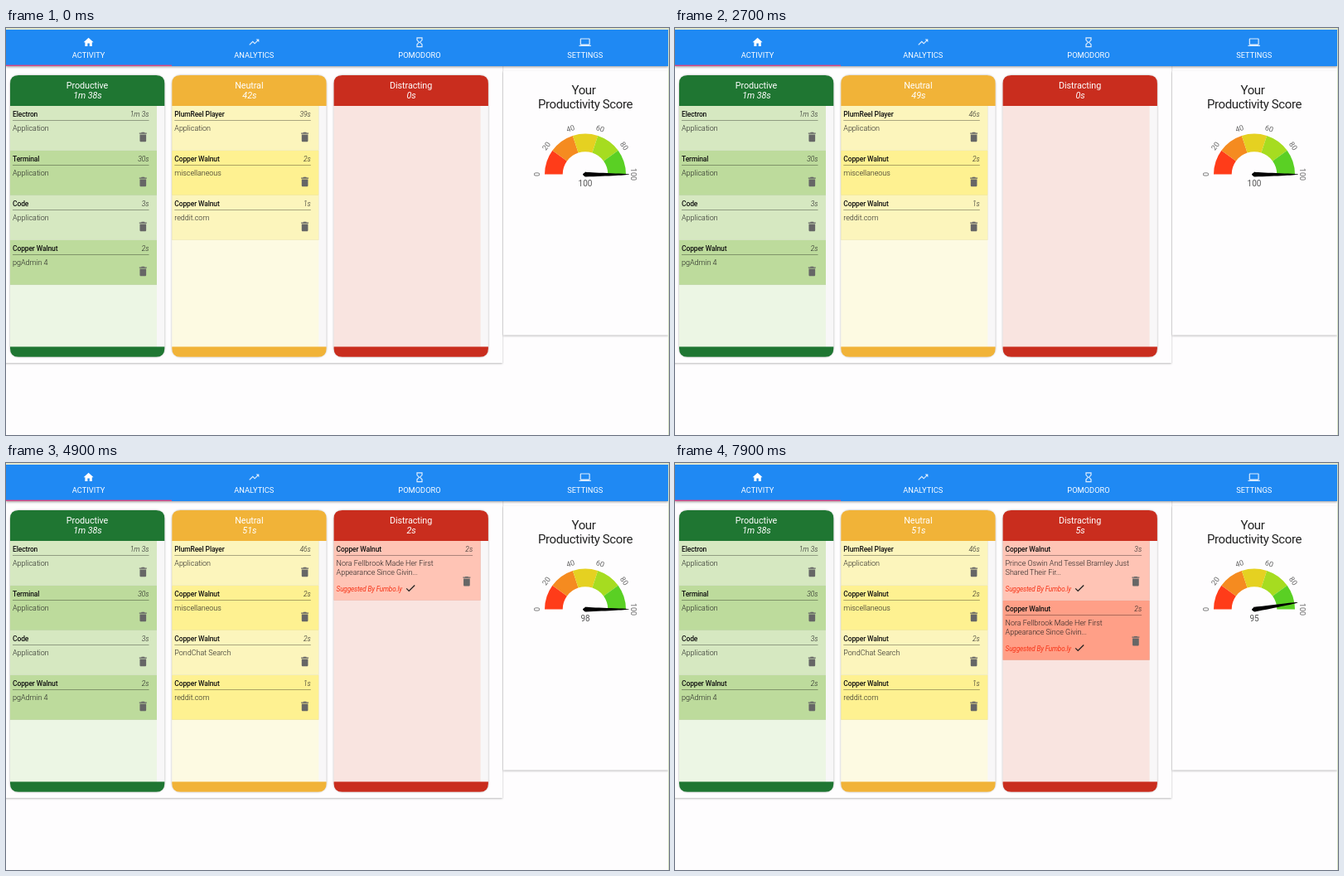
An HTML page that plays this animation: 800 px wide and 491 px high, repeating every 8 s.

```html
<!DOCTYPE html>
<html lang="en">
<head>
<meta charset="utf-8">
<title>Productivity dashboard</title>
<style>
  html, body { margin: 0; width: 100%; height: 100%; overflow: hidden; background: #fefdfe; }
  svg { display: block; width: 800px; height: 491px; font-family: Roboto, Arial, sans-serif; }
  .panel { fill: #fefdfe; filter: drop-shadow(0 1px 1px #0004); }
  .nav { font-size: 9.3px; fill: #fff; text-anchor: middle; }
  .head { font-size: 10.8px; letter-spacing: -.08px; fill: #fff; text-anchor: middle; }
  .name { font-size: 8.5px; font-weight: 500; letter-spacing: -.13px; fill: #111; }
  .time { font-size: 8.5px; font-weight: 300; font-style: italic; fill: #222; text-anchor: end; }
  .body { font-size: 9px; font-weight: 300; letter-spacing: -.03px; fill: #222; }
  .hint { font-size: 8.2px; font-style: italic; letter-spacing: -.17px; fill: #f73518; }
  .title { font-size: 15px; letter-spacing: -.38px; fill: #222; text-anchor: middle; }
  .tick { font-size: 9px; fill: #666; text-anchor: middle; }
  .score { font-size: 10px; fill: #555; text-anchor: middle; }
</style>
</head>
<body>
<svg viewBox="0 0 800 491"><g id="page"></g><g id="columns"></g><g id="gauge"></g></svg>
<script>
const LOOP = 8000, MOVE = 500;
const STEPS = [0, 800, 2800, 4820, 7350];
const SCORES = [100, 100, 100, 98, 95];
const BROWSER = 'Copper Walnut';

const ICONS = {
  home: 'M10 20v-6h4v6h5v-8h3L12 3 2 12h3v8z',
  trend: 'M16 6l2.29 2.29-4.88 4.88-4-4L2 16.59 3.41 18l6-6 4 4 6.3-6.29L22 12V6z',
  glass: 'M6 2v6l4 4-4 4v6h12v-6l-4-4 4-4V2zm10 14.5V20H8v-3.5l4-4zm-4-5l-4-4V4h8v3.5z',
  laptop: 'M20 18c1.1 0 2-.9 2-2V6c0-1.1-.9-2-2-2H4c-1.1 0-2 .9-2 2v10c0 1.1.9 2 2 2H0v2h24v-2zM4 6h16v10H4z',
  trash: 'M6 19c0 1.1.9 2 2 2h8c1.1 0 2-.9 2-2V7H6zM19 4h-3.5l-1-1h-5l-1 1H5v2h14z',
  check: 'M9 16.17L4.83 12l-1.42 1.41L9 19 21 7l-1.41-1.41z'
};

const rect = (x, y, w, h, fill, more = '') =>
  `<rect x="${x}" y="${y}" width="${w}" height="${h}" fill="${fill}" ${more}/>`;
const text = (cls, x, y, s, more = '') => `<text class="${cls}" x="${x}" y="${y}" ${more}>${s}</text>`;
const icon = (name, cx, cy, scale, fill, opacity = 1) =>
  `<path d="${ICONS[name]}" fill="${fill}" opacity="${opacity}" transform="translate(${cx} ${cy}) scale(${scale}) translate(-12 -12)"/>`;
const set = (id, html) => document.getElementById(id).innerHTML = html;

function page() {
  const tabs = [['ACTIVITY', 'home'], ['ANALYTICS', 'trend'], ['POMODORO', 'glass'], ['SETTINGS', 'laptop']];
  return '<rect class="panel" x="-2" y="40" width="601" height="364"/>' +
    '<rect class="panel" x="600" y="52" width="199" height="318.5"/>' +
    rect(0, 2, 799, 44, '#1f89f3', 'style="filter:drop-shadow(0 1px 1.5px #0006)"') +
    rect(0, 0, 800, 1.5, '#dce4c6') + rect(799, 0, 1, 491, '#d5e0c4') +
    rect(0, 44.6, 200, 1.4, '#e0487f') +
    tabs.map(([label, name], i) => {
      const x = 99.6 + i * 199.7;
      return icon(name, x, 17.2, .6, '#fff', i ? .85 : 1) + text('nav', x, 36.3, label);
    }).join('') +
    text('title', 697, 80, 'Your') + text('title', 699, 97, 'Productivity Score');
}

function card(x, y, fill, [name, time, lines, hinted]) {
  const h = hinted ? 72 : 54;
  return rect(x, y, 177, h - .3, fill, 'style="filter:drop-shadow(0 .5px .5px #0003)"') +
    text('name', x + 3, y + 13.2, name) + text('time', x + 167.5, y + 13.2, time) +
    rect(x + 3, y + 17.3, 164.5, .7, '#0007') +
    lines.split('|').map((s, i) => text('body', x + 3, y + 29.8 + i * 11, s)).join('') +
    icon('trash', x + 160.3, y + (hinted ? 48.7 : 37.6), .64, '#666') +
    (hinted ? text('hint', x + 3, y + 61, 'Suggested By Fumbo.ly') + icon('check', x + 92.5, y + 57, .62, '#222') : '');
}

function column(x, label, total, dark, pale, fills, cards) {
  let y = 94;
  const list = cards.map((c, i) => {
    const html = card(x, y, fills[i % 2], c);
    y += c[3] ? 72 : 54;
    return html;
  }).join('');
  return rect(x, 57, 186.3, 339.7, '#f8f7f8', 'rx="10" style="filter:drop-shadow(0 .7px 1px #0005)"') +
    rect(x, 94, 177, 291, pale) + list +
    `<path d="M${x} 94V67q0-10 10-10h166.3q10 0 10 10v27z" fill="${dark}"/>` +
    `<path d="M${x} 384.5v2.2q0 10 10 10h166.3q10 0 10-10v-2.2z" fill="${dark}"/>` +
    text('head', x + 93, 73, label) + text('head', x + 93.5, 85.3, total, 'font-style="italic"');
}

function columns(step) {
  const work = [['Electron', '1m 3s', 'Application'], ['Terminal', '30s', 'Application'],
    ['Code', '3s', 'Application'], [BROWSER, '2s', 'pgAdmin 4']];
  const neutral = [['PlumReel Player', step ? '46s' : '39s', 'Application'],
    [BROWSER, '2s', 'miscellaneous'], [BROWSER, '1s', 'reddit.com']];
  if (step > 1) neutral.splice(2, 0, [BROWSER, '2s', 'PondChat Search']);
  const bad = [];
  if (step > 2) bad.push([BROWSER, '2s', 'Nora Fellbrook Made Her First|Appearance Since Givin...', true]);
  if (step > 3) bad.unshift([BROWSER, '3s', 'Prince Oswin And Tessel Bramley Just|Shared Their Fir...', true]);
  return column(5, 'Productive', '1m 38s', '#1f7632', '#ecf6e4', ['#d6e8c1', '#bddb9c'], work) +
    column(200.3, 'Neutral', ['42s', '49s', '51s', '51s', '51s'][step], '#f1b338', '#fdfae2', ['#fcf5bc', '#fef191'], neutral) +
    column(395.6, 'Distracting', ['0s', '0s', '0s', '2s', '5s'][step], '#c92d1e', '#f9e4e0', ['#ffc4b5', '#ff9f87'], bad);
}

function gauge(value, score) {
  const at = (r, deg) => `${r * Math.cos(deg * Math.PI / 180)} ${-r * Math.sin(deg * Math.PI / 180)}`;
  const outer = 49, inner = 27.3;
  const arcs = ['#ff3c19', '#f58b20', '#e5d121', '#a6dc20', '#5ad024'].map((fill, i) => {
    const a = 180 - i * 36, b = a - 36;
    return `<path fill="${fill}" d="M${at(outer, a)}A${outer} ${outer} 0 0 1 ${at(outer, b)}L${at(inner, b)}A${inner} ${inner} 0 0 0 ${at(inner, a)}z"/>`;
  }).join('');
  const ticks = [0, 20, 40, 60, 80, 100].map(v =>
    text('tick', 0, -55, v, `transform="rotate(${v * 1.8 - 90})"`)).join('');
  const needle = 'M3 0C2-26.5 1-53 0-53C-1-53-2 0-3 0C-2 0-1 3 0 3C1 3 2 1.5 3 0z';
  return `<g transform="translate(699 176.5)">${arcs}${ticks}` +
    `<path d="${needle}" transform="rotate(${value * 1.8 - 90})"/>${text('score', 0, 14, score)}</g>`;
}

const ease = p => p < .5 ? 2 * p * p : 1 - 2 * (1 - p) ** 2;
let shown = -1;

function frame(now) {
  const t = now % LOOP;
  const step = STEPS.filter(s => s <= t).length - 1;
  if (step !== shown) set('columns', columns(shown = step));
  const from = SCORES[Math.max(0, step - 1)];
  const p = ease(Math.min(1, (t - STEPS[step]) / MOVE));
  set('gauge', gauge(from + (SCORES[step] - from) * p, SCORES[step]));
  requestAnimationFrame(frame);
}

set('page', page());
frame(performance.now());
</script>
</body>
</html>
```
